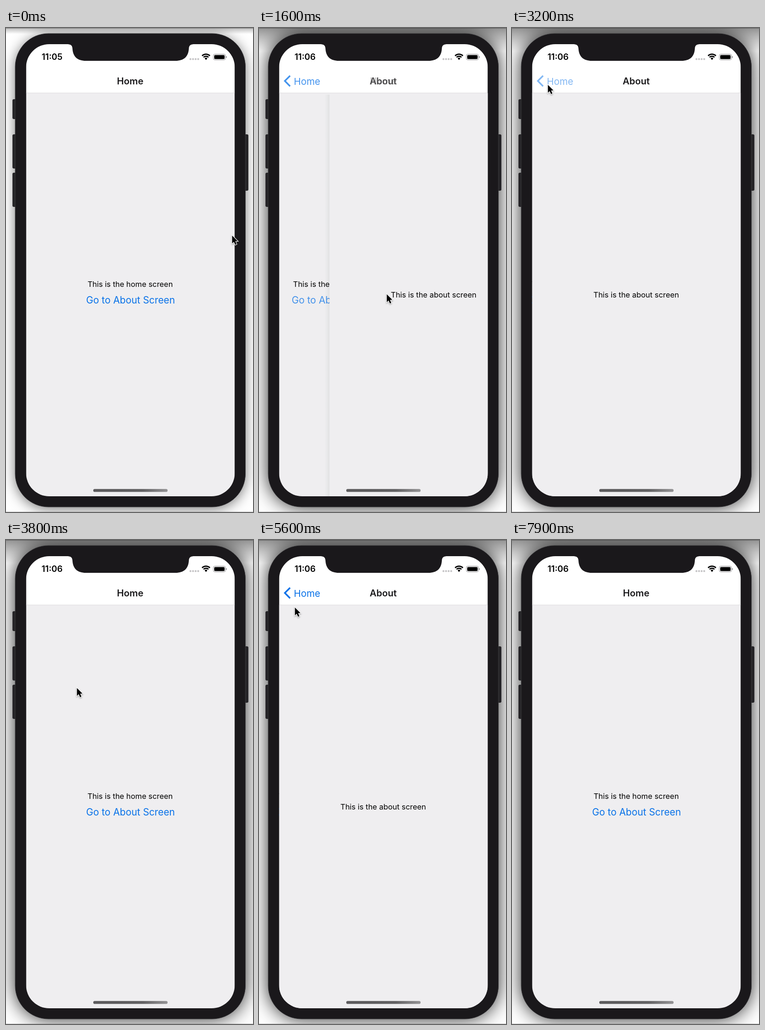
Recreate the animation shown at these times as an HTML page with a canvas. Size 535 by 1047 pixels, loop 8.3 s.

```html
<!DOCTYPE html>
<html lang="en">
<head>
<meta charset="utf-8">
<title>Stack navigation</title>
<style>
  html, body { margin: 0; width: 100%; height: 100%; overflow: hidden; background: #fff; }
  canvas { display: block; }
</style>
</head>
<body>
<canvas id="stage" width="535" height="1047"></canvas>
<script>
const ctx = document.getElementById('stage').getContext('2d');
const W = 535, H = 1047, LOOP = 8300, STEP = 100, LAST = 7900;
const SCREEN = { x: 43.5, y: 35, w: 452, h: 978 };
const HEADER_BOTTOM = 141;
const BLUE = '#0972e8', BODY = '#efeef0', INK = '#1a181b';

const FOCUS_AT = 700, MINUTE_AT = 1300, HIDE_CURSOR_AT = 7000;
const PRESS = 135;
const PUSHES = [1450, 4600], POPS = [3250, 6150];

// time, x, y of the pointer tip
const POINTER = [
  [0, 489, 448], [100, 482, 455], [400, 350, 545], [650, 284, 577], [1300, 276, 575],
  [1900, 276, 575], [2300, 88, 146], [2500, 86, 142], [3000, 77, 122], [3500, 77, 122],
  [4200, 254, 582], [4400, 258, 586], [4800, 258, 586], [5100, 195, 428], [5500, 80, 152],
  [5600, 77, 145], [5900, 59, 114], [6250, 62, 113], [6450, 220, 72], [6700, 439, 130],
  [6900, 513, 186], [7000, 545, 215]
];

const easeInOut = u => u < 0.5 ? 2 * u * u : 1 - 2 * (1 - u) ** 2;
const clamp = u => Math.min(1, Math.max(0, u));

// Critically damped spring, stiffness 1000 and mass 3
function spring(ms) {
  if (ms <= 0) return 0;
  const a = Math.sqrt(1000 / 3) * ms / 1000;
  return 1 - Math.exp(-a) * (1 + a);
}

function progress(t) {
  let p = 0;
  for (const at of PUSHES) p += spring(t - at);
  for (const at of POPS) p -= spring(t - at);
  return clamp(p);
}

function touchOpacity(t, releases) {
  for (const up of releases) {
    const down = up - PRESS;
    if (t >= down && t < up) return 1 - 0.8 * easeInOut(clamp((t - down) / 150));
    if (t >= up && t < up + 250) return 0.2 + 0.8 * easeInOut((t - up) / 250);
  }
  return 1;
}

function pointerAt(t) {
  let i = 0;
  while (i < POINTER.length - 2 && POINTER[i + 1][0] <= t) i++;
  const [t0, x0, y0] = POINTER[i], [t1, x1, y1] = POINTER[i + 1];
  const u = clamp((t - t0) / (t1 - t0));
  return [x0 + (x1 - x0) * u, y0 + (y1 - y0) * u];
}

function roundBox(x, y, w, h, r, fill) {
  ctx.beginPath();
  ctx.roundRect(x, y, w, h, r);
  if (fill) {
    ctx.fillStyle = fill;
    ctx.fill();
  }
}

function gradient(x0, y0, x1, y1, ...stops) {
  const g = ctx.createLinearGradient(x0, y0, x1, y1);
  stops.forEach((color, i) => g.addColorStop(i / (stops.length - 1), color));
  return g;
}

function label(text, x, y, size, { color = '#000', weight = 400, align = 'center', alpha = 1 } = {}) {
  if (alpha <= 0) return;
  ctx.save();
  ctx.globalAlpha = alpha;
  ctx.font = `${weight} ${size}px Inter, Roboto, sans-serif`;
  ctx.textAlign = align;
  ctx.fillStyle = color;
  ctx.fillText(text, x, y);
  ctx.restore();
}

function drawBackdrop(focused) {
  ctx.fillStyle = '#fff';
  ctx.fillRect(0, 0, W, H);
  const edge = focused ? 0.42 : 0.26, depth = focused ? 50 : 13;
  ctx.fillStyle = gradient(0, 0, 0, depth, `rgba(0,0,0,${edge})`, 'rgba(0,0,0,0)');
  ctx.fillRect(0, 0, W, depth);
  ctx.save();
  ctx.shadowColor = `rgba(0,0,0,${focused ? 0.85 : 0.55})`;
  ctx.shadowBlur = focused ? 42 : 28;
  ctx.shadowOffsetY = focused ? 0 : 4;
  roundBox(20, 12, 498.5, 1024, 72, INK);
  ctx.restore();
  ctx.fillStyle = 'rgba(0,0,0,0.35)';
  ctx.fillRect(0, 0, W, 1);
  ctx.fillStyle = 'rgba(0,0,0,0.2)';
  ctx.fillRect(0, H - 1, W, 1);
}

function drawBody() {
  for (const [x, y, h] of [[14, 154, 43], [14, 230, 74], [14, 313, 74], [516, 230, 122]]) {
    roundBox(x, y, 9, h, 3, '#252427');
  }
  roundBox(20, 12, 498.5, 1024, 72, INK);
  ctx.strokeStyle = '#39383b';
  ctx.lineWidth = 1;
  ctx.stroke();
}

function drawPages(t, p) {
  const { x, w } = SCREEN;
  const bottom = SCREEN.y + SCREEN.h;
  const homeX = 269 - 0.3 * w * p;
  const offset = w * (1 - p);

  ctx.fillStyle = BODY;
  ctx.fillRect(x, HEADER_BOTTOM, w, bottom - HEADER_BOTTOM);
  label('This is the home screen', homeX, 560, 16.4);
  label('Go to About Screen', homeX + 0.7, 595.5, 20.8, { color: BLUE, alpha: touchOpacity(t, PUSHES) });

  if (p <= 0.0005) return;
  const left = x + offset;
  if (p < 0.9995) {
    ctx.fillStyle = gradient(left - 11, 0, left, 0, 'rgba(60,80,70,0)', 'rgba(60,80,70,0.03)', 'rgba(60,80,70,0.085)');
    ctx.fillRect(left - 11, HEADER_BOTTOM + 3, 11, bottom);
  }
  ctx.fillStyle = BODY;
  ctx.fillRect(left, HEADER_BOTTOM, w, bottom);
  label('This is the about screen', 269 + offset, 583, 16.4);
}

function drawHeader(t, p) {
  ctx.fillStyle = '#fff';
  ctx.fillRect(SCREEN.x, SCREEN.y, SCREEN.w, HEADER_BOTTOM - SCREEN.y);
  ctx.fillStyle = '#dddcde';
  ctx.fillRect(SCREEN.x, HEADER_BOTTOM - 1, SCREEN.w, 1);

  const title = { color: '#19181a', weight: 600 };
  label('Home', 269, 122, 20.2, { ...title, alpha: 1 - p });
  label('About', 269, 122, 20, { ...title, alpha: p });

  const alpha = p * touchOpacity(t, POPS);
  label('Home', 75.5, 122.5, 20.4, { color: BLUE, align: 'left', alpha });
  ctx.save();
  ctx.globalAlpha = alpha;
  ctx.strokeStyle = BLUE;
  ctx.lineWidth = 3.5;
  ctx.beginPath();
  ctx.moveTo(67.3, 103.3);
  ctx.lineTo(56, 114.6);
  ctx.lineTo(67.3, 126);
  ctx.stroke();
  ctx.restore();
}

function drawStatus(t) {
  label(t < MINUTE_AT ? '11:05' : '11:06', 99.8, 69.3, 18.5, { weight: 600 });
  for (let i = 0; i < 4; i++) roundBox(397.5 + i * 5.6, 65.3, 4, 4, 1.5, '#c5c4c6');

  ctx.save();
  ctx.strokeStyle = ctx.fillStyle = '#000';
  ctx.lineWidth = 2.8;
  for (const r of [11.8, 7.4]) {
    ctx.beginPath();
    ctx.arc(433.2, 68.5, r, -Math.PI * 0.755, -Math.PI * 0.245);
    ctx.stroke();
  }
  ctx.beginPath();
  ctx.moveTo(433.2, 69.3);
  ctx.arc(433.2, 68.5, 4.2, -Math.PI * 0.755, -Math.PI * 0.245);
  ctx.fill();
  ctx.restore();

  roundBox(449, 56.5, 26.5, 12.6, 3.6);
  ctx.strokeStyle = '#929194';
  ctx.lineWidth = 1;
  ctx.stroke();
  roundBox(451, 58.4, 22.5, 8.8, 2, '#000');
  roundBox(476.6, 60.8, 1.6, 4.2, 0.8, '#929194');
}

function drawNotch() {
  ctx.fillStyle = INK;
  ctx.beginPath();
  ctx.moveTo(131, 34);
  ctx.lineTo(131, 35);
  ctx.bezierCurveTo(140, 35, 143.5, 37, 144, 45);
  ctx.bezierCurveTo(145, 62, 155, 71, 173, 71);
  ctx.lineTo(367, 71);
  ctx.bezierCurveTo(385, 71, 395, 62, 396, 45);
  ctx.bezierCurveTo(396.5, 37, 400, 35, 409, 35);
  ctx.lineTo(409, 34);
  ctx.fill();
}

function drawPointer(t) {
  if (t >= HIDE_CURSOR_AT) return;
  const shape = [[0, 0], [0, 17], [3.9, 13.4], [6.8, 20], [9.7, 18.7], [6.9, 12.3], [12, 12.1]];
  ctx.save();
  ctx.translate(...pointerAt(t));
  ctx.translate(0.8, 1);
  ctx.beginPath();
  shape.forEach(([x, y]) => ctx.lineTo(x, y));
  ctx.closePath();
  ctx.shadowColor = 'rgba(0,0,0,0.35)';
  ctx.shadowBlur = 3;
  ctx.shadowOffsetY = 1.5;
  ctx.strokeStyle = '#fff';
  ctx.lineWidth = 2.2;
  ctx.stroke();
  ctx.shadowColor = 'transparent';
  ctx.fillStyle = '#000';
  ctx.fill();
  ctx.restore();
}

function draw(t) {
  const p = progress(t);
  drawBackdrop(t >= FOCUS_AT);
  drawBody();
  ctx.save();
  roundBox(SCREEN.x, SCREEN.y, SCREEN.w, SCREEN.h, 50);
  ctx.clip();
  drawPages(t, p);
  drawHeader(t, p);
  drawStatus(t);
  roundBox(189, 997.3, 161, 6.2, 3.1, gradient(189, 0, 350, 0, '#5c5b5d', '#5c5b5d', '#626163', '#949395'));
  ctx.restore();
  drawNotch();
  drawPointer(t);
}

function tick() {
  const t = performance.now() % LOOP;
  draw(Math.min(LAST, Math.floor(t / STEP) * STEP));
  requestAnimationFrame(tick);
}
tick();
</script>
</body>
</html>
```
